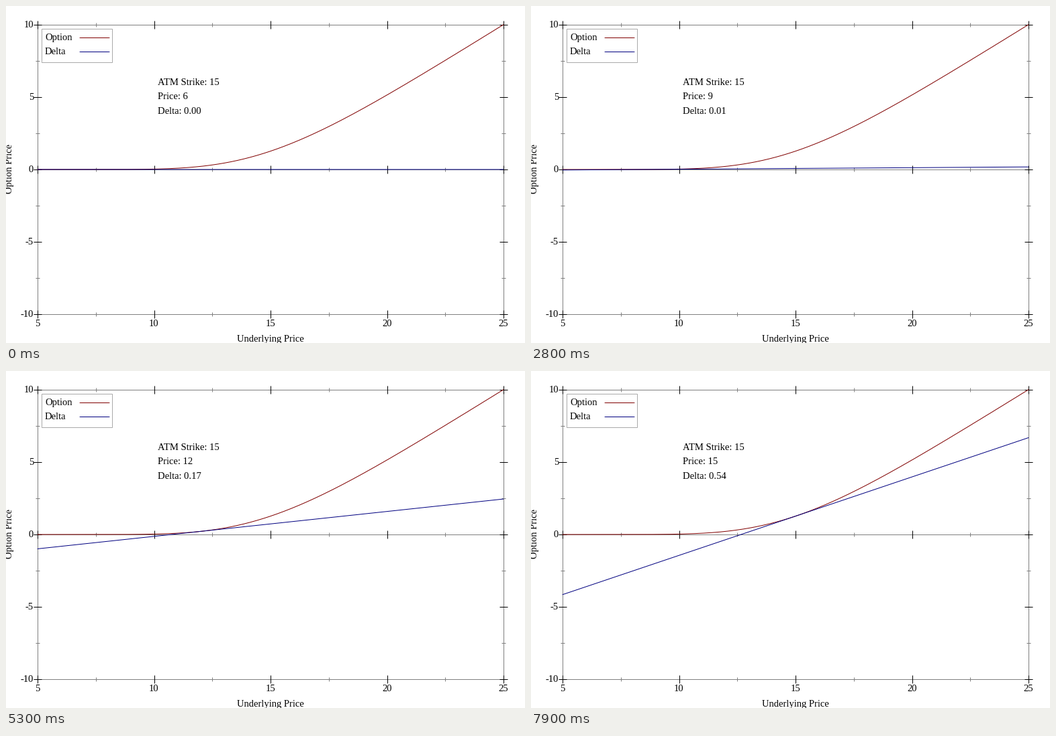
These frames come from a looping animation (773x503 px, 8000 ms). A matplotlib script:

```python
import math

import matplotlib.pyplot as plt
import numpy as np
from matplotlib.animation import FuncAnimation
from matplotlib.patches import Rectangle

W, H, DPI = 773, 503, 128
PX = 72 / DPI                      # points per pixel
STRIKE, VOL, YEARS = 15, 0.3, 0.5
RED, NAVY, GREY, PALE = "#800000", "#000080", "#808080", "#aaaaaa"

STEP_MS = 100
STARTS = [0, 7, 15, 24, 35, 44, 53, 62, 70, 78]   # tick at which each price appears
FIRST_PRICE = 6
# price: (ticks the redraw takes, layers already painted meanwhile)
REDRAW = {8: (1, 2), 9: (4, 2), 10: (1, 2), 14: (1, 0), 15: (1, 1)}

plt.rcParams["font.family"] = "Liberation Serif"
plt.rcParams["font.size"] = 14.67 * PX


def norm_cdf(z):
    return 0.5 * (1 + math.erf(z / math.sqrt(2)))


def call(s):
    """Value and delta of a call at zero interest."""
    sd = VOL * math.sqrt(YEARS)
    d1 = math.log(s / STRIKE) / sd + sd / 2
    delta = norm_cdf(d1)
    return s * delta - STRIKE * norm_cdf(d1 - sd), delta


def sx(x):
    return 47 + (x - 5) * 34.7


def sy(y):
    return 244 - y * 21.6


fig = plt.figure(figsize=(W / DPI, H / DPI), dpi=DPI, facecolor="white")
ax = fig.add_axes([0, 0, 1, 1])
ax.set_xlim(0, W)
ax.set_ylim(H, 0)
ax.axis("off")

labels, chart, legend = [], [], []
LAYERS = [labels, chart, legend]   # in painting order


def line(layer, x, y, color, z=2, snap=True, cap="butt"):
    art, = ax.plot(x, y, color=color, lw=PX, snap=snap,
                   solid_capstyle=cap, zorder=z)
    layer.append(art)
    return art


def curve(layer, x, y, color, z):
    return line(layer, x, y, color, z, snap=False, cap="round")


def text(layer, x, y, s, **kw):
    art = ax.text(x, y, s, va="baseline", zorder=6, **kw)
    layer.append(art)
    return art


def box(layer, x0, y0, x1, y1, fill, edge):
    art = Rectangle((x0, y0), x1 - x0, y1 - y0, fc=fill, ec=edge, lw=PX,
                    snap=True, zorder=1)
    layer.append(ax.add_patch(art))


# Axis titles
text(labels, 394, 501, "Underlying Price", ha="center")
text(labels, 9, 243, "Option Price", ha="center", rotation=90,
     rotation_mode="anchor")

# Frame, zero line and ticks
box(chart, sx(5), sy(10), sx(25), sy(-10), "none", GREY)
line(chart, [sx(5), sx(25)], [sy(0)] * 2, GREY)


def tick_style(v):
    return (6, "black", 3) if v % 5 == 0 else (3, GREY, 2)


for v in np.arange(5, 25.1, 2.5):
    r, color, z = tick_style(v)
    for y in (sy(10), sy(0), sy(-10)):
        line(chart, [sx(v)] * 2, [y - r, y + r], color, z)
    if r == 6:
        text(chart, sx(v), 478.5, f"{v:.0f}", ha="center")

for v in np.arange(-10, 10.1, 2.5):
    r, color, z = tick_style(v)
    for x in (sx(5), sx(25)):
        line(chart, [x - r, x + r], [sy(v)] * 2, color, z)
    if r == 6:
        text(chart, 41, sy(v) + 4, f"{v:.0f}", ha="right")

# Option curve and its tangent
prices = np.linspace(5, 25, 500)
curve(chart, sx(prices), [sy(call(s)[0]) for s in prices], RED, 4)
tangent = curve(chart, [sx(5), sx(25)], [sy(0)] * 2, NAVY, 5)

text(chart, 226, 118, f"ATM Strike: {STRIKE}")
price_text = text(chart, 226, 139.4, "")
delta_text = text(chart, 226, 161, "")

# Legend
box(legend, 53, 34, 158, 84, "white", PALE)
for name, color, y in (("Option", RED, 51), ("Delta", NAVY, 72)):
    text(legend, 58, y, name)
    curve(legend, [110, 154], [y - 3.5] * 2, color, 2)


def draw(i):
    k = max(n for n, start in enumerate(STARTS) if start <= i)
    price = FIRST_PRICE + k
    value, delta = call(price)
    tangent.set_ydata([sy(value + delta * (x - price)) for x in (5, 25)])
    price_text.set_text(f"Price: {price}")
    delta_text.set_text(f"Delta: {delta:.2f}")

    ticks, painted = REDRAW.get(price, (0, 0))
    shown = painted if i - STARTS[k] < ticks else len(LAYERS)
    for n, layer in enumerate(LAYERS):
        for art in layer:
            art.set_visible(n < shown)
    return []


anim = FuncAnimation(fig, draw, frames=80, interval=STEP_MS, repeat=True,
                     repeat_delay=0, blit=False)
plt.show()
```
